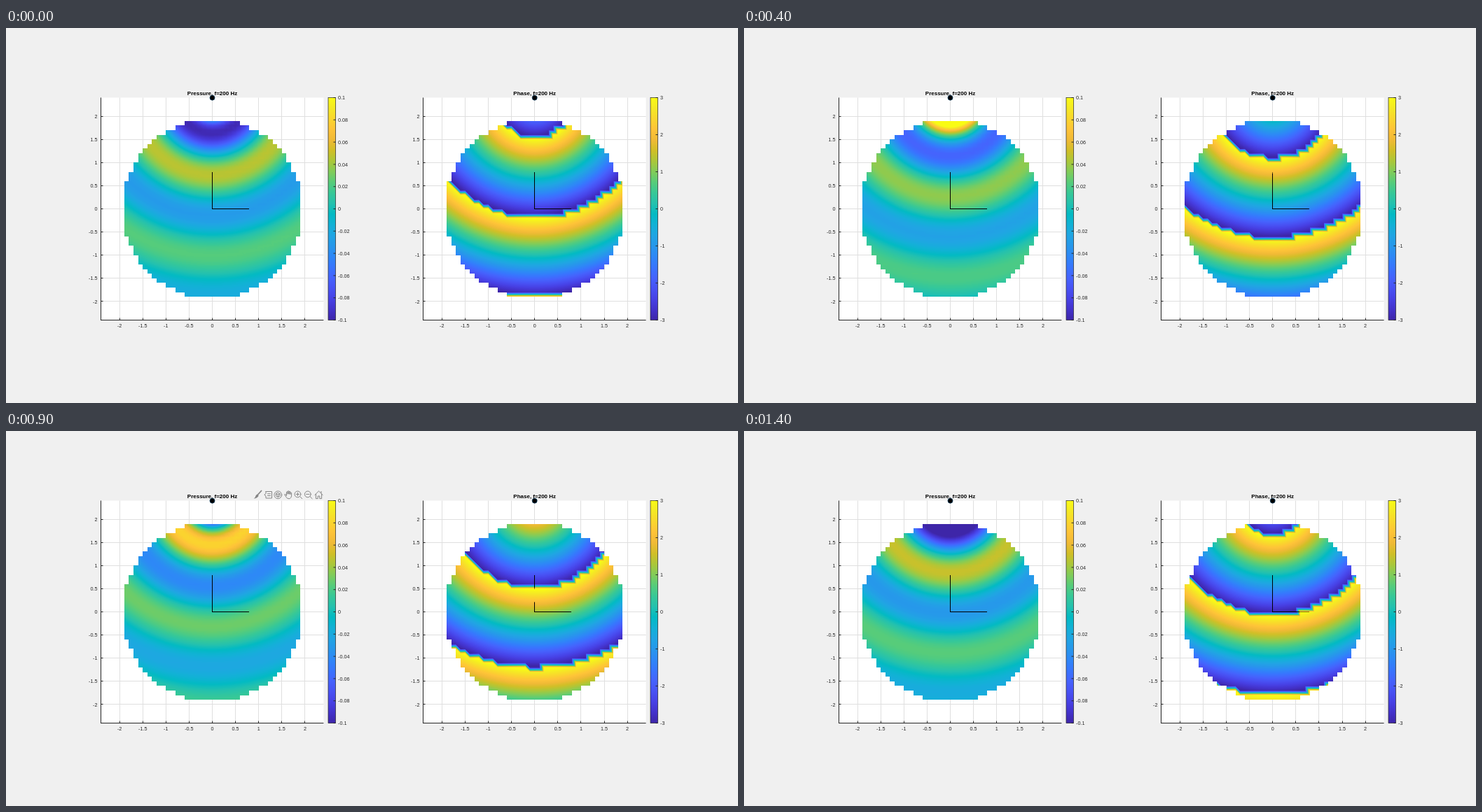
Recreate the animation shown at these times as an HTML page with a canvas. Size 1045 by 536 pixels, loop 1.5 s.

```html
<!DOCTYPE html>
<html lang="en">
<head>
<meta charset="utf-8">
<title>Point source, 200 Hz</title>
<style>
  html, body { margin: 0; width: 100%; height: 100%; overflow: hidden; background: #f0f0f0; }
  svg, canvas { position: absolute; left: 0; top: 0; width: 1045px; height: 536px; }
  text { font: 7.2px "Liberation Sans", Arial, sans-serif; fill: #262626; }
  .title { font-weight: bold; font-size: 8px; fill: #000; text-anchor: middle; }
  .mid { text-anchor: middle; }
  .end { text-anchor: end; }
  .axis { stroke: #262626; stroke-width: 1; fill: none; }
  .grid { stroke: #dfdfdf; stroke-width: 1; }
  #tools { fill: none; stroke: #858585; stroke-width: 1; stroke-linecap: round; stroke-linejoin: round; }
</style>
</head>
<body>
<svg id="back" viewBox="0 0 1045 536"></svg>
<canvas id="view" width="1045" height="536"></canvas>
<svg id="front" viewBox="0 0 1045 536">
  <g id="dots" fill="#000" stroke="#0b3a5c" stroke-width=".8"></g>
  <g id="tools" visibility="hidden">
    <path d="M364.5 85.5 L359.5 91" stroke-width="1.8"/>
    <path d="M359 90.5 l1.7 1.7 q-1.5 4 -7 4.3 q2.4 -1.6 2.6 -3.6 q.8 -2 2.7 -2.4z" fill="#858585" stroke="none"/>
    <path d="M371 86.5 h8.5 v9.5 h-8.5 v-3 l-2.2 -1.8 l2.2 -1.8z M373.5 89.8 h4 M373.5 92.5 h4"/>
    <circle cx="388.3" cy="91.3" r="5.4"/>
    <path d="M388.3 88.2 l2.8 1.5 v3.2 l-2.8 1.6 l-2.8 -1.6 v-3.2z M385.5 89.7 l2.8 1.5 l2.8 -1.5 M388.3 91.2 v3.3"/>
    <path d="M400.5 92 v-4.8 q.9 -1.2 1.7 0 v3 v-4 q.9 -1.2 1.8 0 v4 v-3.4 q.9 -1.2 1.8 0 v3.8 v-2.2 q1.2 -1.2 1.8 0 v3.8 q-.4 4.4 -3.6 4.6 q-3 0 -4 -2.4 l-2.4 -3.6 q.6 -1.6 2.9 1.2z"/>
    <circle cx="416.4" cy="90.4" r="4.4"/>
    <path d="M419.7 93.7 l3 3 M414.2 90.4 h4.4 M416.4 88.2 v4.4"/>
    <circle cx="430.8" cy="90.4" r="4.4"/>
    <path d="M434.1 93.7 l3 3 M428.6 90.4 h4.4"/>
    <path d="M440.8 91.5 l5.7 -5.6 l5.7 5.6 M442.4 90.4 v6.2 h2.8 v-3.6 h2.6 v3.6 h2.8 v-6.2 M450 86.4 v2.2"/>
  </g>
</svg>
<script>
const SCALE = 66.2, Y0 = 258.5, SRC_Y = 2.4, LIM = 2.4;
const K = 2 * Math.PI * 200 / 343;
const FRAMES = 15, STEP = 100, N = 19;
const LINE_Z = 2.07, LINE_LEN = 0.8;

const stops = ('3e26a8 4332cb 4741e5 4852f4 4563fd 3875fe 2e87f7 2797eb 20a5e3 12b1d6 02bac3 ' +
  '24c1ae 37c897 57cc7a 81cc59 abc739 d1bf27 f0ba36 fec338 fad62d f5e924 f9fb14').split(' ');

const wrap = a => Math.atan2(Math.sin(a), Math.cos(a));
const panels = [
  { x0: 294.5, bar: 460, max: 0.1, tick: 0.02, title: 'Pressure, f=200 Hz',
    value: (r, wt) => Math.cos(wt - K * r) / (4 * Math.PI * r) },
  { x0: 754.7, bar: 920, max: 3, tick: 1, title: 'Phase, f=200 Hz',
    value: (r, wt) => wrap(wt - K * r) }
];

// Colour lookup with 256 levels, interpolated between the stops
const rgb = stops.map(h => [0, 2, 4].map(i => parseInt(h.substr(i, 2), 16)));
const palette = Array.from({ length: 256 }, (_, i) => {
  const p = i / 255 * (rgb.length - 1), a = Math.min(Math.floor(p), rgb.length - 2);
  return rgb[a].map((c, j) => c + (rgb[a + 1][j] - c) * (p - a));
});

function buildAxes() {
  let out = '<defs><linearGradient id="map" x1="0" y1="1" x2="0" y2="0">' +
    stops.map((c, i) => `<stop offset="${i / (stops.length - 1)}" stop-color="#${c}"/>`).join('') +
    '</linearGradient></defs>';
  const line = (cls, x1, y1, x2, y2) =>
    out += `<line class="${cls}" x1="${x1}" y1="${y1}" x2="${x2}" y2="${y2}"/>`;
  const text = (cls, x, y, s) => out += `<text class="${cls}" x="${x}" y="${y}">${s}</text>`;
  const snap = v => Math.floor(v) + 0.5;
  const half = LIM * SCALE, top = snap(Y0 - half), bottom = snap(Y0 + half);

  for (const p of panels) {
    const left = snap(p.x0 - half), right = p.x0 + half;
    out += `<rect x="${left}" y="${top}" width="${right - left}" height="${bottom - top}" fill="#fff"/>`;
    for (let v = -2; v <= 2; v += 0.5) {
      const x = snap(p.x0 + v * SCALE), y = snap(Y0 - v * SCALE);
      line('grid', x, top, x, bottom);
      line('grid', left, y, right, y);
      line('axis', x, bottom, x, bottom - 3);
      line('axis', left, y, left + 3, y);
      text('mid', p.x0 + v * SCALE, 428, v);
      text('end', left - 5, Y0 - v * SCALE + 2.6, v);
    }
    line('axis', left, top, left, bottom + 0.5);
    line('axis', left, bottom, right, bottom);
    text('title', p.x0, 95.7, p.title);

    out += `<rect x="${p.bar}" y="${top}" width="10.5" height="${bottom - top}" fill="url(#map)" stroke="#262626" stroke-width=".7"/>`;
    const count = Math.round(2 * p.max / p.tick);
    for (let i = 0; i <= count; i++) {
      const y = top + (bottom - top) * i / count;
      line('axis', p.bar + 7.5, y, p.bar + 10.5, y);
      text('', p.bar + 14, y + 2.6, +(p.max - i * p.tick).toFixed(2));
    }
    document.getElementById('dots').innerHTML += `<circle cx="${p.x0}" cy="99.7" r="3.5"/>`;
  }
  document.getElementById('back').innerHTML = out;
}

// Values on a 0.1 grid inside the circle of radius 2
function makeGrid(value, wt) {
  const grid = [];
  for (let j = -N; j <= N; j++)
    for (let i = -N; i <= N; i++)
      grid.push(i * i + j * j <= 400 ? value(Math.hypot(i / 10, j / 10 - SRC_Y), wt) : NaN);
  return grid;
}

// Linear interpolation over two triangles per cell
function sample(grid, x, y) {
  const gx = x * 10 + N, gy = y * 10 + N, i = Math.floor(gx), j = Math.floor(gy);
  if (i < 0 || j < 0 || i >= 2 * N || j >= 2 * N) return NaN;
  const u = gx - i, v = gy - j, w = 2 * N + 1, at = j * w + i;
  const a = grid[at], b = grid[at + 1], c = grid[at + w], d = grid[at + w + 1];
  if (isNaN(a + b + c + d)) return NaN;
  return u + v < 1 ? a + u * (b - a) + v * (c - a)
                   : d + (1 - u) * (c - d) + (1 - v) * (b - d);
}

const ctx = document.getElementById('view').getContext('2d');
const SIZE = 254;

function drawPanel(p, wt) {
  const grid = makeGrid(p.value, wt);
  const left = Math.floor(p.x0) - SIZE / 2, top = Math.floor(Y0) - SIZE / 2;
  const at = (px, py) => sample(grid, (px - p.x0) / SCALE, (Y0 - py) / SCALE);
  const img = ctx.createImageData(SIZE, SIZE);
  for (let y = 0, o = 0; y < SIZE; y++)
    for (let x = 0; x < SIZE; x++, o += 4) {
      const v = at(left + x + 0.5, top + y + 0.5);
      if (isNaN(v)) continue;
      const level = Math.round((v / p.max + 1) * 127.5);
      img.data.set(palette[Math.max(0, Math.min(255, level))], o);
      img.data[o + 3] = 255;
    }
  ctx.putImageData(img, left, top);

  // The two short lines lie at a fixed height and sink below high values
  const cx = Math.floor(p.x0), cy = Math.floor(Y0), len = Math.round(LINE_LEN * SCALE);
  const dot = (x, y) => {
    const seen = [0, 1.6].filter(d => at(x + 0.5, y + 0.5 - d) < LINE_Z).length;
    ctx.fillStyle = `rgba(0,0,0,${seen / 2})`;
    ctx.fillRect(x, y, 1, 1);
  };
  for (let i = 0; i < len; i++) {
    dot(cx, cy - i);
    if (i) dot(cx + i, cy);
  }
}

const tools = document.getElementById('tools');
let shown = -1;

function tick() {
  const n = Math.floor(performance.now() / STEP) % FRAMES;
  if (n !== shown) {
    shown = n;
    ctx.clearRect(0, 0, 1045, 536);
    for (const p of panels) drawPanel(p, 2 * Math.PI * n / FRAMES);
    tools.setAttribute('visibility', n === 9 ? 'visible' : 'hidden');
  }
  requestAnimationFrame(tick);
}

buildAxes();
tick();
</script>
</body>
</html>
```
